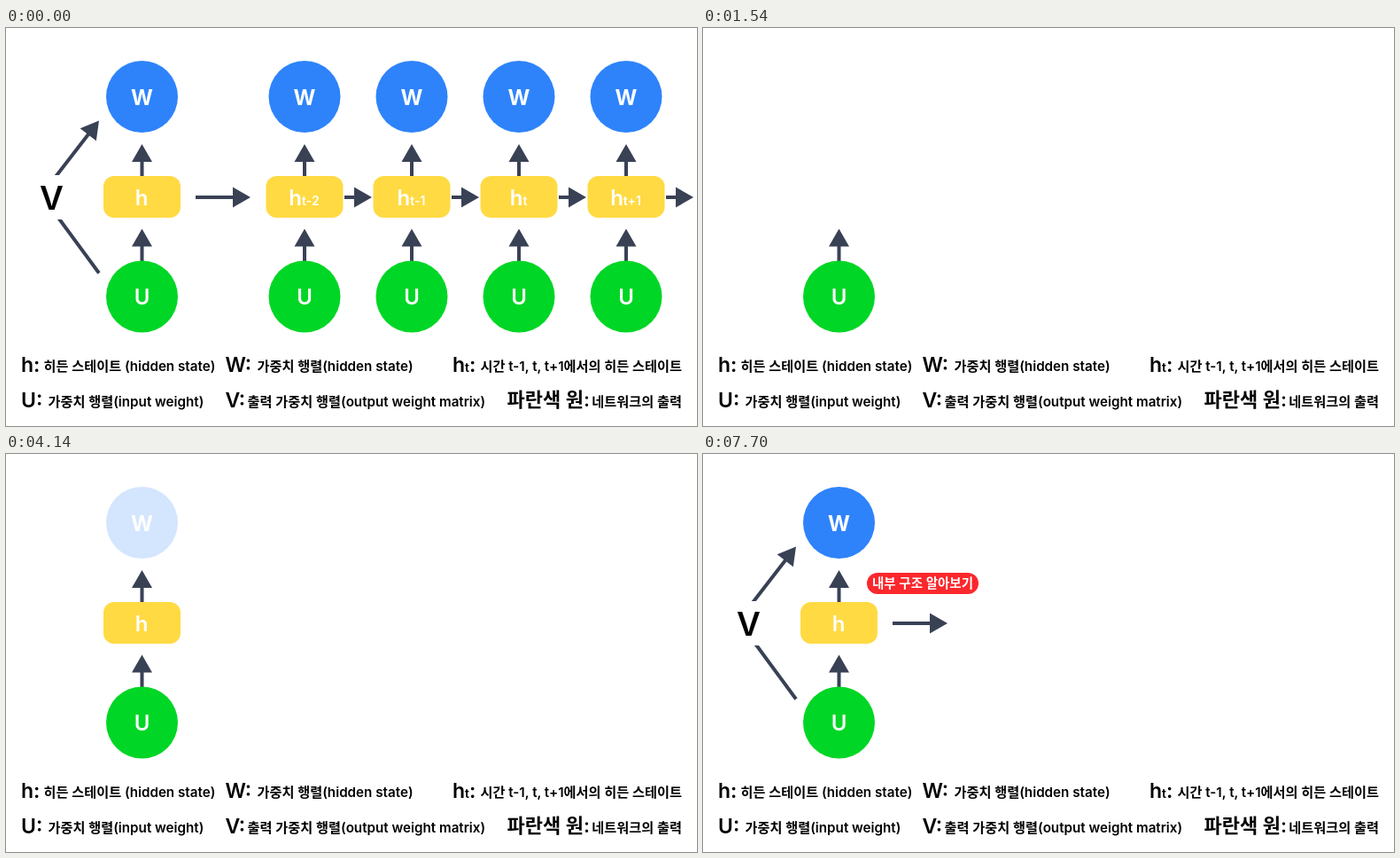
Write an HTML page that moves like this. It is 780 by 449 pixels and loops after 8 s.

```html
<!DOCTYPE html>
<html lang="ko">
<head>
<meta charset="utf-8">
<style>
html, body { margin: 0; width: 100%; height: 100%; overflow: hidden; background: #fff; }
svg { display: block; }
text { font: 600 15.2px Inter, "Noto Sans CJK KR", "Noto Sans CJK", sans-serif; }
.node { font-size: 24px; fill: #fff; text-anchor: middle; }
.sub { font-size: 14px; }
.key { font-size: 23px; }
.end { text-anchor: end; }
</style>
</head>
<body>
<svg id="stage" width="780" height="449" viewBox="0 0 780 449"></svg>
<script>
const INK = '#394155';
const text = (x, y, s, cls = '', extra = '') =>
  `<text x="${x}" y="${y}" class="${cls}" ${extra}>${s}</text>`;
const sub = s => `<tspan class="sub">${s}</tspan>`;
const group = (id, ...parts) => `<g id="${id}">${parts.join('')}</g>`;

// Arrow of a given length whose tip sits at x, y; angle 0 points right
const arrow = (x, y, length, angle) =>
  `<path transform="translate(${x} ${y}) rotate(${angle})" fill="${INK}"
    d="M0 0L-20 11.5V2H${-length}V-2H-20V-11.5Z"/>`;

const circle = (x, y, fill, label, weight) =>
  `<circle cx="${x}" cy="${y}" r="40.5" fill="${fill}"/>` +
  text(x, y + 9, label, 'node', `style="font-weight:${weight}"`);

const input = x => arrow(x, 226.5, 38, -90) + circle(x, 303, '#00d625', 'U', 600);
const output = x => circle(x, 77.5, '#2e83fb', 'W', 700);
const hidden = (x, label) => arrow(x, 131, 37, -90) +
  `<rect x="${x - 43.5}" y="167" width="87" height="47" rx="12" fill="#ffda43"/>` +
  text(x - .5, 199.5, label, 'node');

const column = (step, i) => {
  const x = 337 + 121 * i;
  return input(x) + hidden(x, 'h' + sub(step)) + output(x) + arrow(x + 76, 191, 31, 0);
};

const legend = [
  text(17, 387.5, 'h:', 'key'),
  text(42.5, 387, '히든 스테이트 (hidden state)'),
  text(247.5, 387.5, 'W:', 'key'),
  text(283.5, 387, '가중치 행렬(hidden state)'),
  text(504, 387.5, `h${sub('t')}:`, 'key'),
  text(763, 387, '시간 t-1, t, t+1에서의 히든 스테이트', 'end'),
  text(17, 427.5, 'U:', 'key'),
  text(47.5, 427, '가중치 행렬(input weight)'),
  text(247.5, 427.5, 'V:', 'key'),
  text(272.5, 427, '출력 가중치 행렬(output weight matrix)'),
  text(659, 427, '파란색 원:', 'key end', 'style="font-size:22px"'),
  text(763, 427, '네트워크의 출력', 'end')
];

const stage = document.getElementById('stage');
stage.innerHTML =
  group('unrolled', ...['t-2', 't-1', 't', 't+1'].map(column)) +
  group('loop',
    arrow(105, 104.5, 85, -52.2),
    `<path d="M105 276.5L57 211.2" stroke="${INK}" stroke-width="4"/>`,
    '<rect x="35" y="166" width="35" height="50" fill="#fff"/>',
    text(51.5, 205, 'V', '', 'text-anchor="middle" style="font-size:37px"')) +
  group('input', input(153.5)) +
  group('hidden', hidden(153.5, 'h')) +
  group('output', output(153.5)) +
  group('next', arrow(276, 191, 62, 0)) +
  group('badge',
    '<rect x="185" y="134" width="126" height="24" rx="12" fill="#fb282d"/>',
    text(248, 151.3, '내부 구조 알아보기', '', 'text-anchor="middle" fill="#fff" style="font-size:14.5px"')) +
  legend.join('');

// Fades run in ten steps of 60 ms
const fade = (t, start) => Math.max(0, Math.min(10, Math.floor((t - start) / 60) + 1)) / 10;
const show = (id, opacity) => stage.querySelector('#' + id).setAttribute('opacity', opacity);
const returns = { hidden: 2540, output: 4080, loop: 5620, next: 7160 };

function draw(now) {
  const t = now % 8000;
  const out = 1 - fade(t, 1000);
  show('unrolled', out);
  for (const id in returns) show(id, Math.max(out, fade(t, returns[id])));
  show('badge', fade(t, returns.next));
  requestAnimationFrame(draw);
}
draw(0);
</script>
</body>
</html>
```
